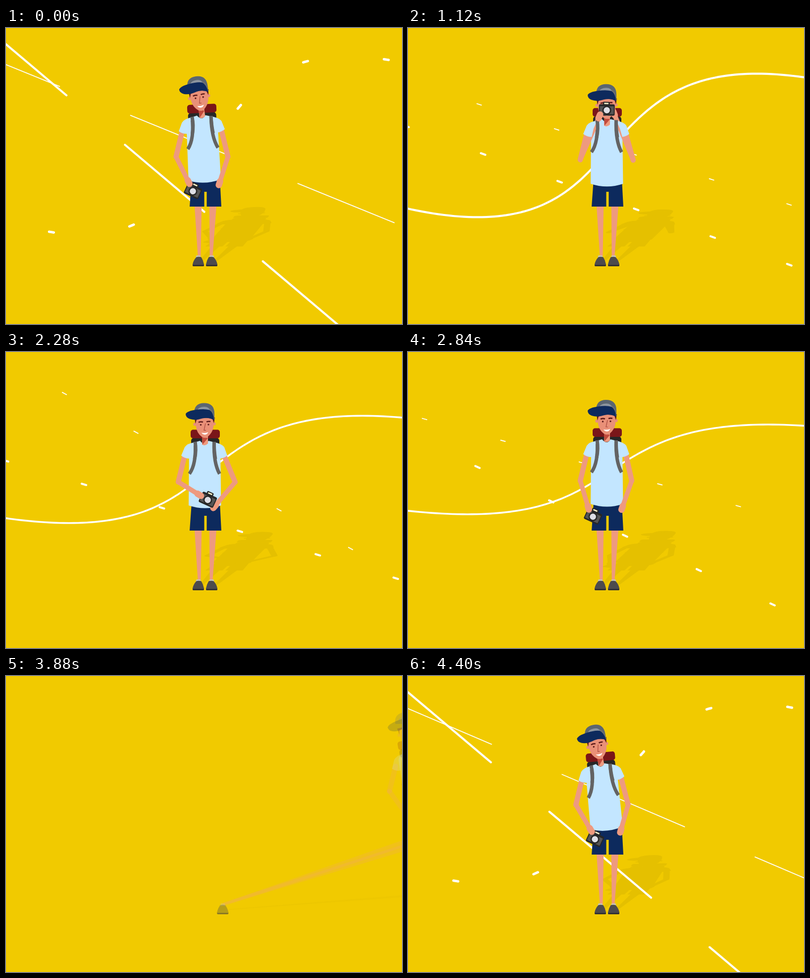
An HTML page with a canvas that plays this animation: 800 px wide and 600 px high, repeating every 4.44 s.

```html
<!DOCTYPE html>
<html lang="en">
<head>
<meta charset="utf-8">
<title>Traveller with a camera</title>
<style>
  html, body { margin: 0; width: 100%; height: 100%; overflow: hidden; background: #f1ca00; }
  canvas { display: block; width: 800px; height: 600px; }
</style>
</head>
<body>
<canvas id="stage" width="800" height="600"></canvas>
<script>
const ctx = document.getElementById('stage').getContext('2d');
const LOOP = 4440, ENTER = -560, LEAVE = 3320;
const RAD = Math.PI / 180;
const C = {
  bg: '#f1ca00', shade: '#e5c000', skin: '#ee9a7f', face: '#e99078', neck: '#c04a3c',
  hair: '#5c1a1a', navy: '#0d2a5d', shirt: '#c3e6ff', strap: '#636363', dark: '#272727',
  roll: '#7a1619', shoe: '#4d4b4d', cap: '#5b6671', panel: '#8c959f'
};
const clamp = (v, a = 0, b = 1) => Math.min(b, Math.max(a, v));
const ease = v => { const s = clamp(v); return s * s * (3 - 2 * s); };
const mix = (a, b, s) => a + (b - a) * s;

// Camera place and turn, the angle at which the left hand holds it,
// how far the right hand has joined it, and how low the body sinks.
const rest  = { x: 374, y: 333, turn: 25, hold: 243, grip: 0, drop: 0 };
const chest = { x: 434, y: 219, turn: 13, hold: 180, grip: 1, drop: 1 };
const face  = { x: 400, y: 163, turn: 0, hold: 132, grip: 1, drop: 8 };
const waist = { x: 408, y: 299, turn: 25, hold: 209, grip: 1, drop: 3 };
const steps = [[300, rest], [600, chest], [1200, face], [1780, face], [2280, waist], [2780, rest]];

function poseAt(t) {
  let [from, pose] = steps[0];
  for (const [to, next] of steps.slice(1)) {
    if (t <= from) break;
    const s = ease((t - from) / (to - from)), blend = {};
    for (const key in next) blend[key] = mix(pose[key], next[key], s);
    if (t < to) return blend;
    from = to;
    pose = next;
  }
  return pose;
}

// Streaks shrink to dashes while the gaps between them stay the same.
const GAP = 155;
const dashLength = t => 9.5 + 202 * Math.max(0, 1 - t / 600) ** 4;

const thick = {
  x: 322, width: 4.2,
  y: t => 306 + 12 * clamp(t / 1200),
  angle: t => t < 1600 ? 40.3 - 33.5 * clamp(t / 1600) ** 1.4 : 6.8 + 0.0147 * (t - 1600),
  reach: (t, angle) => (360 + 124 * clamp(t / 780)) / Math.cos(angle * RAD)
};
const thin = {
  x: 402, width: 1.9,
  y: () => 238.5,
  angle: t => 22 + 10.2 * Math.cos(0.141 * (t - 1925) * RAD),
  reach: (t, angle) => 528 + 0.062 * t + 1.9 * (22 - angle)
};

function drawLine(line, t) {
  const grow = clamp((t - ENTER - 20) / 220), out = clamp((LEAVE - 40 - t) / 280);
  if (!grow || !out) return;
  const angle = line.angle(t), reach = line.reach(t, angle);
  const at = s => [line.x + s * Math.cos(angle * RAD), line.y(t) + s * Math.sin(angle * RAD)];
  ctx.setLineDash([dashLength(t), GAP]);
  ctx.lineDashOffset = 0;
  ctx.lineWidth = line.width * out;
  ctx.beginPath();
  ctx.moveTo(...at(-reach));
  ctx.lineTo(...at(-reach + 1800 * grow));
  ctx.stroke();
}

// The wave starts as dashes, which lengthen until it is one solid line.
function drawWave(t) {
  const grow = clamp((t - ENTER - 60) / 200), out = clamp((LEAVE - 40 - t) / 340);
  if (!grow || !out) return;
  const amp = 181 - 0.0317 * t, half = 268 + 0.0125 * t;
  const start = 1.6 - 3.2 * out;
  let px, py, before = 0;
  ctx.beginPath();
  for (let i = 0; i <= 160; i++) {
    const v = -1.6 + i * 0.02;
    const x = 413 + half * (v < 0 ? 0.965 : 1.035) * (0.68 * v + 0.32 * v ** 3);
    const y = 238 - amp * (1.5 * v - 0.5 * v ** 3);
    if (i && v < 0.001) before += Math.hypot(x - px, y - py);
    if (v >= start - 1e-6) ctx.lineTo(x, y);
    px = x;
    py = y;
  }
  const phase = Math.max(41, 98 - 0.095 * t);
  const dash = 9.5 + 2400 * clamp((t - 620) / 600) ** 4;
  ctx.setLineDash(t < 1220 ? [dash, GAP] : []);
  ctx.lineDashOffset = 4 * (9.5 + GAP) + 5 - before - phase;
  ctx.lineWidth = mix(5, 3.6, clamp((t - 600) / 900)) * grow;
  ctx.stroke();
}

let tint = null;
function fill(path, color) {
  ctx.fillStyle = tint || color;
  ctx.fill(typeof path === 'string' ? new Path2D(path) : path);
}
function stroke(path, color, width) {
  ctx.strokeStyle = tint || color;
  ctx.lineWidth = width;
  ctx.stroke(new Path2D(path));
}
function disc(x, y, r, color) {
  const p = new Path2D();
  p.arc(x, y, r, 0, 7);
  fill(p, color);
}
function box(x, y, w, h, r, color) {
  const p = new Path2D();
  p.roundRect(x, y, w, h, r);
  fill(p, color);
}
function group(draw) {
  ctx.save();
  draw();
  ctx.restore();
}
function turn(x, y, degrees, dy = 0) {
  ctx.translate(x, y + dy);
  ctx.rotate(degrees * RAD);
  ctx.translate(-x, -y);
}

// A tapered leg between a planted ankle and a hip that may be far away.
function drawLeg(hipX, hipY, ankleX, ankleY) {
  const dx = ankleX - hipX, dy = ankleY - hipY, r = Math.hypot(dx, dy);
  const side = (x, y, w) => `${x + dy / r * w} ${y - dx / r * w}`;
  fill(`M${side(hipX, hipY, 7.3)}L${side(ankleX, ankleY, 2.9)}L${side(ankleX, ankleY, -2.9)}L${side(hipX, hipY, -7.3)}Z`, C.skin);
}

function drawFoot(x) {
  group(() => {
    ctx.translate(x, 0);
    fill('M-4 461H4L5 466H-5Z', '#c9c3b4');
    fill('M-4 464.500Q1 463 6 464.500Q10 471 11.500 479V481Q11.500 483 9.500 483H-9.500Q-11.500 483 -11.500 481V479Q-10 471 -4 464.500Z', C.shoe);
    fill('M-11.500 480H11.500V481Q11.500 483 9.500 483H-9.500Q-11.500 483 -11.500 481Z', '#333233');
  });
}

function drawHead() {
  fill('M397 160H408V179Q402 185 396 181Z', C.skin);
  fill('M396 165L408 168L397 181Z', C.neck);
  disc(381.5, 140, 3.2, C.face);
  disc(420.5, 139, 3.2, C.face);
  fill('M382 126H420.500L419 146Q417 157 408 165Q402 170 395 165Q386 158 384 146Z', C.face);
  fill('M381 126H422L420 138L417 129Q400 124 385 131L382.500 139Z', C.hair);
  stroke('M389 136Q393 134 398 135.500M405 135Q409 133.500 413 134.500', C.hair, 2.6);
  disc(393.5, 141, 1.7, C.hair);
  disc(409, 140.5, 1.7, C.hair);
  stroke('M403 138L400 152H404', '#a9473c', 1.2);
  fill('M395 157Q402 158.500 408.500 156Q406 161.500 401 161Q397 160.500 395 157Z', '#fff');
  fill('M380 116Q381 97 400 97Q421 97 421 118V131Q400 120 380 116Z', C.cap);
  fill('M411 108Q420 112 421 131L411 120Z', '#6f7172');
  fill('M387 111Q389 105 400 104.500Q410 104 412 112Z', C.panel);
  fill('M363 119Q366 113 384 110.500Q401 108 411 111Q419 116 420.500 131.500Q409 125 397 128Q382 133 371 129Q363 126 363 119Z', C.navy);
}

function drawPack() {
  box(374, 171, 57, 17, 6, C.dark);
  box(373, 154.5, 59, 17.5, 5, C.roll);
}

function drawShirt() {
  fill('M392 177Q402 189 409 177L425 181Q433 184 433 196L434.500 308Q402 319 369 308L370 194Q370 184 378 181Z', C.shirt);
  stroke('M382 179Q385 224 370.500 244M420.500 179Q419 222 431.500 244', C.strap, 7);
}

function drawSleeves() {
  fill('M382 180Q366 182 361 190L354 207Q361 213 371 213L375 196Z', C.shirt);
  fill('M421 180Q436 183 441 190L447 207Q441 212 433 213L428 196Z', C.shirt);
  stroke('M382 179Q385 196 381 214M420.500 179Q420 196 423 214', C.strap, 7);
}

function drawArm(shoulder, elbow, hand) {
  stroke(`M${shoulder}L${elbow}`, C.skin, 10.5);
  stroke(`M${elbow}L${hand}`, C.skin, 9.5);
}
function drawHand([ex, ey], [hx, hy]) {
  const r = Math.hypot(hx - ex, hy - ey);
  stroke(`M${hx} ${hy}l${(hx - ex) / r * 8} ${(hy - ey) / r * 8}`, C.skin, 13);
}

function drawCamera(x, y, degrees) {
  group(() => {
    ctx.translate(x, y);
    ctx.rotate(degrees * RAD);
    box(-8, -16, 14, 8, 2, C.dark);
    box(-5.5, -14, 9, 3, 1, '#f6f0c8');
    box(-16, -11, 32, 23, 3, C.dark);
    box(-14, -7, 28, 16, 1, '#555');
    disc(0, 1, 9, C.dark);
    disc(0, 1, 6.3, '#dedfe6');
  });
}

function drawBody(t) {
  const { x, y, turn: camTurn, hold, grip, drop } = poseAt(t);
  const arriving = clamp(1 - t / 300);
  const swing = 2.3 - 5 * Math.max(0, 1 - t / 600) ** 6.5;
  const lean = Math.max(-9, swing) * (1 - ease((t - 600) / 500));
  const torso = draw => group(() => { turn(402, 314, lean, drop); draw(); });
  const shoulder = (sx, sy) => {
    const p = new DOMMatrix().translate(402, 314 + drop).rotate(lean).translate(-402, -314)
      .transformPoint({ x: sx, y: sy });
    return [p.x, p.y];
  };

  const camX = x + 4 * arriving, camY = y - 3 * arriving;
  const leftElbow = [348 + 1.7 * Math.min(lean, 0), 261 + 0.8 * drop];
  const rightElbow = [452 + 1.4 * lean + 16 * grip - 1.7 * drop, 261 + 0.9 * drop];
  const leftHand = [camX + 24 * Math.cos(hold * RAD), camY + 24 * Math.sin(hold * RAD)];
  const rightHand = [mix(434 + 0.6 * lean, x + 16, grip), mix(312 + 0.5 * lean, y + 11, grip)];

  ctx.lineCap = 'butt';
  fill('M375 306H432L435 362H405.500V332H400.500V362H371Z', C.navy);
  torso(() => {
    drawPack();
    drawShirt();
    turn(402, 172, -5 * arriving, 1.2 * drop);
    drawHead();
  });
  ctx.lineCap = 'round';
  drawArm(shoulder(362, 203), leftElbow, leftHand);
  drawArm(shoulder(439, 203), rightElbow, rightHand);
  drawHand(rightElbow, rightHand);
  ctx.lineCap = 'butt';
  torso(drawSleeves);
  ctx.lineCap = 'round';
  drawCamera(camX, camY, camTurn);
  drawHand(leftElbow, leftHand);
}

// The body rushes in from the right and out to the left; the feet trail behind.
function drawMan(t, rush) {
  const slide = 450 * rush, rise = -28 * Math.abs(rush);
  const feet = [388.5, 415.5].map((x, i) => x + rush * (rush > 0 === (i === 1) ? 23 : 50));
  feet.forEach((x, i) => drawLeg(388 + 30 * i + slide, 358 + rise, x + 2 - 3 * i, 463));
  if (!tint) {
    drawFoot(feet[0]);
    group(() => { ctx.translate(2 * feet[1], 0); ctx.scale(-1, 1); drawFoot(feet[1]); });
  }
  group(() => { ctx.translate(slide, rise); drawBody(t); });
}

function drawFlash(t) {
  const p = (t - 1520) / 240;
  if (p < 0 || p > 1) return;
  ctx.globalAlpha = 0.16 * (1 - p);
  disc(398, 154, 20 + 150 * p, '#fff');
  ctx.globalAlpha = 0.75 * (1 - p);
  disc(398, 158, 11, '#fff');
}

function render(time) {
  // Negative times run up to the arrival at zero.
  const t = time > 3600 ? time - LOOP : time;
  ctx.globalAlpha = 1;
  ctx.fillStyle = C.bg;
  ctx.fillRect(0, 0, 800, 600);
  if (t < ENTER || t >= LEAVE) return;

  const exit = clamp((t - 2980) / 320);
  const rush = Math.exp((ENTER - t) / 55) - exit ** 4;
  const alpha = Math.min(clamp(0.18 + (t - ENTER) / 150), 1 - 0.85 * exit ** 3);

  ctx.globalAlpha = alpha;
  tint = C.shade;
  group(() => {
    ctx.transform(1.18, 0, -0.32, 0.303, 402 * -0.18 + 478 * 0.32, 478 * 0.697);
    drawMan(t, rush);
  });
  tint = null;

  ctx.globalAlpha = 1;
  ctx.strokeStyle = '#fff';
  ctx.lineCap = 'round';
  drawLine(thin, t);
  drawLine(thick, t);
  drawWave(t);
  ctx.setLineDash([]);

  ctx.globalAlpha = alpha;
  drawMan(t, rush);
  drawFlash(t);
}

const began = performance.now();
function tick() {
  render((performance.now() - began) % LOOP);
  requestAnimationFrame(tick);
}
tick();
</script>
</body>
</html>
```
